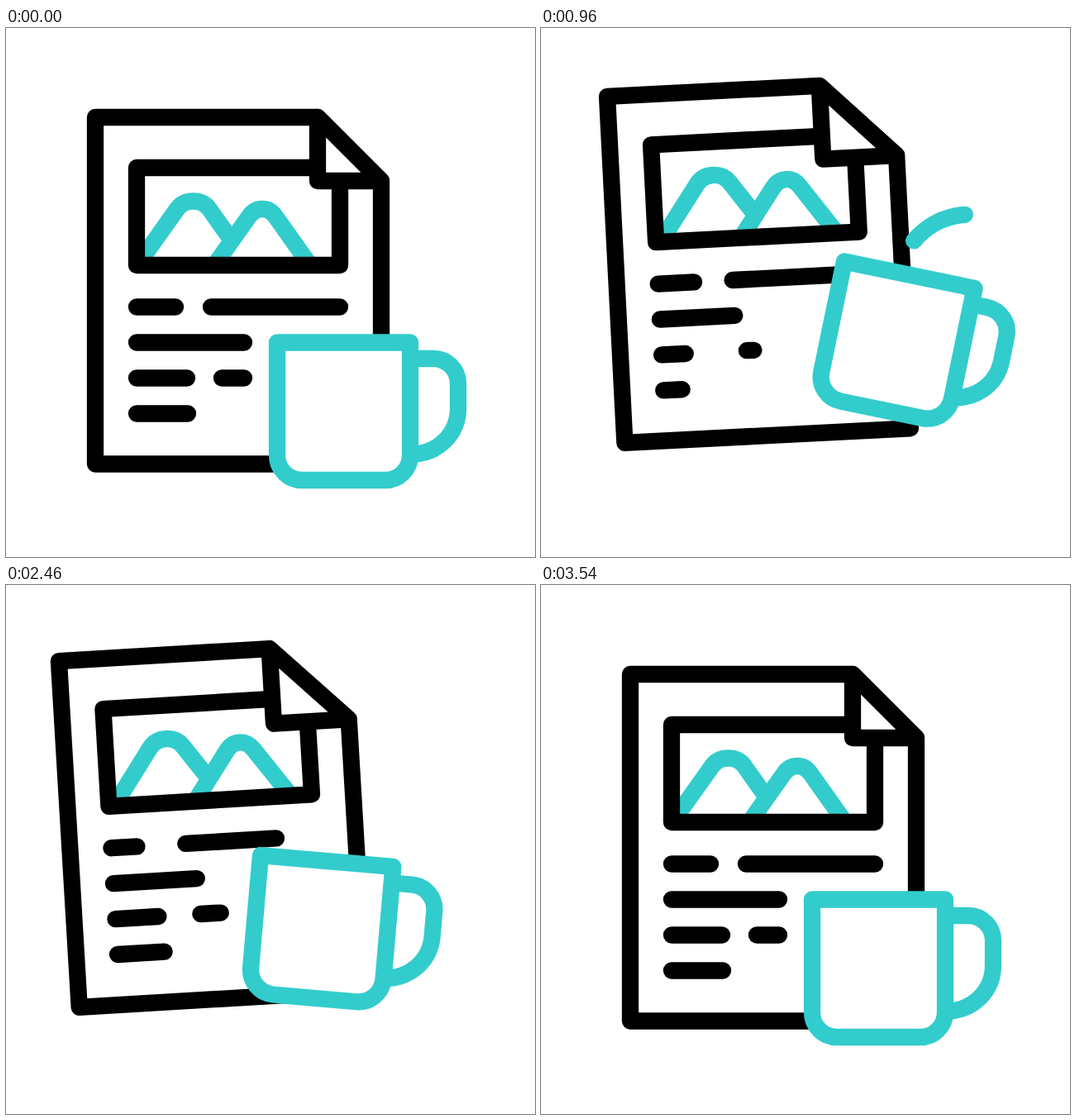
Write an HTML page that moves like this. It is 640 px wide and 640 px high and loops after 3.6 s.

```html
<!DOCTYPE html>
<html lang="en">
<head>
<meta charset="utf-8">
<title>Newspaper and mug</title>
<style>
  html, body { margin: 0; width: 100%; height: 100%; overflow: hidden; background: #fff; }
  svg { display: block; width: 100%; height: 100%; }
  path, line, rect { stroke-width: 20.3; stroke-linejoin: round; }
  .ink { stroke: #000; fill: none; }
  .teal { stroke: #33cccc; fill: none; }
  .solid { fill: #fff; }
  .cap { stroke-linecap: round; }
</style>
</head>
<body>
<svg viewBox="0 0 640 640">
  <defs><clipPath id="window"><rect x="158" y="169" width="246" height="118"/></clipPath></defs>
  <g id="paper">
    <path id="sheet" class="ink solid"/>
    <g clip-path="url(#window)">
      <path id="hillA" class="teal"/>
      <path id="hillB" class="teal"/>
    </g>
    <rect class="ink" x="158" y="169" width="246" height="118"/>
    <path id="fold" class="ink solid"/>
    <g class="ink cap">
      <line x1="158" y1="337.500" x2="205" y2="337.500"/>
      <line x1="248" y1="337.500" x2="404" y2="337.500"/>
      <line x1="158" y1="380.500" x2="288" y2="380.500"/>
      <line x1="158" y1="423.500" x2="219" y2="423.500"/>
      <line x1="261" y1="423.500" x2="288" y2="423.500"/>
      <line x1="158" y1="466.500" x2="220" y2="466.500"/>
    </g>
  </g>
  <g id="mug">
    <path id="handle" class="teal" d="M480 400H517a30 30 0 0 1 30 30V460C547 491 523 515 490 516"/>
    <path class="teal solid" d="M328 380.500H489V517a30 30 0 0 1-30 30H358a30 30 0 0 1-30-30Z"/>
  </g>
  <path id="drop" class="teal cap" pathLength="100" d="M432 303C438 250 490 212 551 230"/>
</svg>
<script>
const LOOP = 3600;
const $ = id => document.getElementById(id);

// Smooth curve through the points, without overshoot.
function curve(times, values) {
  const last = times.length - 1;
  const rate = i => (values[i + 1] - values[i]) / (times[i + 1] - times[i]);
  const slope = i => {
    if (i === 0 || i === last) return 0;
    const a = rate(i - 1), b = rate(i);
    return a * b <= 0 ? 0 : 2 * a * b / (a + b);
  };
  return t => {
    if (t <= times[0]) return values[0];
    if (t >= times[last]) return values[last];
    const i = times.findIndex(end => end > t) - 1;
    const h = times[i + 1] - times[i], u = (t - times[i]) / h, v = 1 - u;
    return v * v * (1 + 2 * u) * values[i] + u * u * (3 - 2 * u) * values[i + 1]
      + h * u * v * (v * slope(i) - u * slope(i + 1));
  };
}

function ease(t, from, to) {
  const u = Math.min(1, Math.max(0, (t - from) / (to - from)));
  return u * u * (3 - 2 * u);
}

// Both objects rest, dip, fly up, hover, fall, land and rest again.
const BEATS = [0, 400, 700, 1060, 2080, 2460, 2820, 3540];
const swing = (...values) => curve(BEATS, [0, ...values, 0]);
const paper = {
  x: swing(-5, -22, -16.5, -21.9, -32, -3),
  y: swing(22, 33, -50.4, -58.4, -26.6, 21),
  tilt: swing(3, 8, -5.7, -8.3, -3.4, 3)
};
const mug = {
  x: swing(8, 4, 24.3, 22.8, -27.5, 0),
  y: swing(18, -26, -95.4, -121.4, -47, 13),
  tilt: swing(-7, 0, 14.1, 18.5, 5, -4)
};

// Every text line shrinks three times, one after the other.
const STAGGER = 100;
const stretch = curve([200, 520, 930, 1440, 2000, 2490, 3000], [1, 0.3, 0.93, 0.52, 0.92, 0.66, 1]);
const lines = [...document.querySelectorAll("line")].map(el => {
  const x = +el.getAttribute("x1");
  return { el, x, length: el.getAttribute("x2") - x };
});

// Soft parts follow the tilt freely one way and stop early the other way.
const flex = (tilt, free, stop) => tilt < 0 ? -free * tilt : -stop * Math.tanh(tilt);

const shape = (id, d) => $(id).setAttribute("d", d);
function place(id, part, t, cx, cy) {
  const tilt = part.tilt(t);
  $(id).setAttribute("transform",
    `translate(${cx + part.x(t)} ${cy + part.y(t)}) rotate(${tilt}) translate(${-cx} ${-cy})`);
  return tilt;
}

function drawFold(size) {
  const x = 454 - size, y = 108 + size;
  shape("sheet", `M108 108H${x}L454 ${y}V527.500H108Z`);
  shape("fold", `M${x} 108V${y}H454Z`);
}

function drawHills(shift) {
  const a = shift * 0.5, b = shift;
  const w = (41.6 + b - a) / 2; // the first hill ends where it meets the second
  shape("hillA", `M${156.6 + a} 290L${207 + a} 219C${216 + a} 206.300 ${237 + a} 206.300 ${246 + a} 219L${294 + b - w} ${228 + 1.41 * w}`);
  shape("hillB", `M${250 + b} 290L${294 + b} 228C${302.5 + b} 216 ${317.5 + b} 216 ${326 + b} 228L${370 + b} 290`);
}

function drawDrop(t) {
  const head = 100 * ease(t, 580, 1140), tail = 100 * ease(t, 700, 1400);
  const drop = $("drop");
  drop.style.display = head > 0 && tail < 100 ? "" : "none";
  drop.setAttribute("stroke-dasharray", `${Math.max(head - tail, 0.1)} 300`);
  drop.setAttribute("stroke-dashoffset", -tail);
}

function draw(t) {
  const tilt = place("paper", paper, t, 281, 317.5);
  drawFold(77 + flex(tilt, 4.1, 17));
  drawHills(flex(tilt, 3.1, 20));
  lines.forEach(({ el, x, length }, i) => el.setAttribute("x2", x + length * stretch(t - i * STAGGER)));

  const lean = place("mug", mug, t, 408.5, 463);
  $("handle").setAttribute("transform", `translate(${-0.72 * lean} 0)`);
  drawDrop(t);
}

const start = performance.now();
function tick() {
  draw((performance.now() - start) % LOOP);
  requestAnimationFrame(tick);
}
tick();
</script>
</body>
</html>
```
